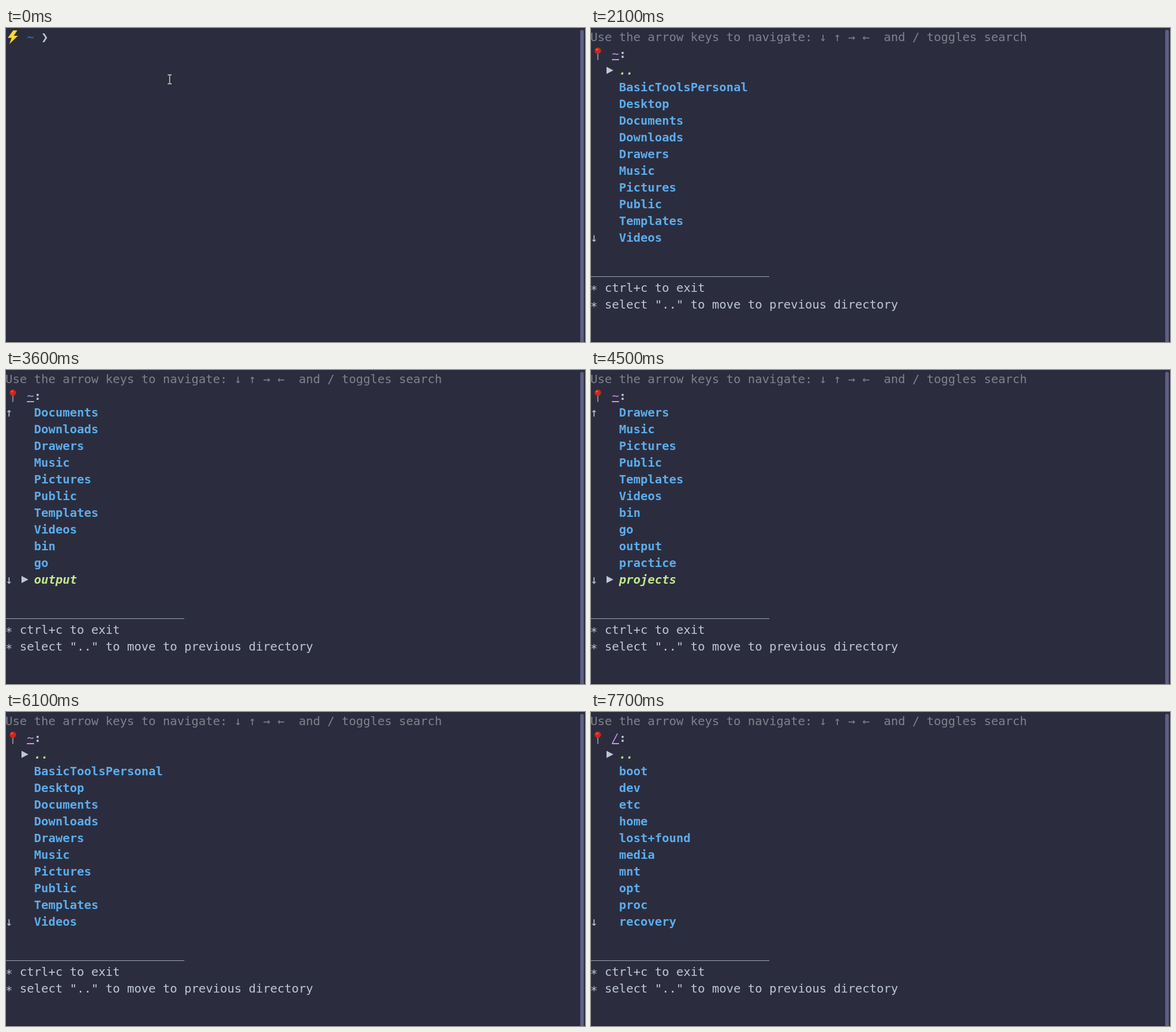
Recreate the animation shown at these times as an HTML page. Size 971 by 526 pixels, loop 8000 ms.

```html
<!DOCTYPE html>
<html lang="en">
<head>
<meta charset="utf-8">
<title>Directory navigator</title>
<style>
  html, body { margin: 0; width: 100%; height: 100%; overflow: hidden; background: #2b2d3e; }
  pre {
    position: absolute; left: -1px; top: 1px; margin: 0;
    font: 20px/28px "DejaVu Sans Mono", monospace;
    letter-spacing: calc(12px - 1ch);
    color: #bfc7d5;
  }
  svg { position: absolute; left: 0; top: 0; }
  .hint { color: #7f828c; }
  .path { color: #c792ea; font-style: italic; text-decoration: underline 2px; text-underline-offset: 2px; }
  .dir { color: #5cadec; font-weight: bold; }
  .picked { color: #c3e88d; font-weight: bold; font-style: italic; }
  .home { color: #0c80e8; }
  .cursor { display: inline-block; width: 12px; height: 28px; vertical-align: top; background: #bfc7d5; }
  .star { position: relative; top: 3px; }
  .rule { position: relative; top: -2px; }
</style>
</head>
<body>
<pre id="screen"></pre>
<svg width="971" height="526">
  <rect x="963" y="3" width="6" height="540" rx="3" fill="#5d6083"/>
  <rect y="524" width="963" height="2" fill="#262838"/>
  <path id="bolt" d="M12 4 3 16.5h6.5L5.5 27 20 13h-7l6-9z" fill="#fdd835"/>
  <g id="pin">
    <path d="M11.5 42v11.5" stroke="#9aa3ab" stroke-width="1.6"/>
    <circle cx="11.5" cy="38" r="5.3" fill="#d3241d"/>
    <circle cx="10" cy="36" r="1.6" fill="#f0604f"/>
  </g>
  <path id="marker" d="M26 65v12l11.5-6z" fill="#bfc7d5"/>
  <path id="mouse" d="M271 78.500h7M274.500 78.500v15M271 93.500h7" fill="none"
        stroke="#b4b4b4" stroke-width="2" style="filter:drop-shadow(0 0 1px #000)"/>
</svg>
<script>
const LOOP = 8000, VISIBLE = 11, ROW = 28;
const el = id => document.getElementById(id);

const places = {
  "~": ("..,BasicToolsPersonal,Desktop,Documents,Downloads,Drawers,Music,Pictures,Public," +
        "Templates,Videos,bin,go,output,practice,projects,snap,tools").split(","),
  "/home": ["..", "user"],
  "/": "..,boot,dev,etc,home,lost+found,media,mnt,opt,proc,recovery,root".split(",")
};

// [time, command, cursor shown]
const typing = [
  [0, "", false], [200, "n", false], [300, "n", true], [400, "na", false], [500, "na", true],
  [1100, "nav", false], [1200, "nav", true], [1300, "nav", false], [1400, "nav", true]
];
// [time, selected entry]
const moves = [
  [2000, 0], [2700, 1], [3200, 3], [3300, 6], [3400, 9], [3500, 12], [3600, 13],
  [4000, 14], [4500, 15], [4600, 17], [5100, 16],
  [5600, 15], [5700, 12], [5800, 9], [5900, 6], [6000, 3], [6100, 0]
];

const span = (kind, text) => `<span class="${kind}">${text}</span>`;
const show = (id, on) => el(id).style.display = on ? "" : "none";

function prompt(t) {
  const [, command, cursor] = typing.findLast(step => step[0] <= t);
  return `   ${span("home", "~")} ❯  ${command}${cursor ? span("cursor", "") : ""}`;
}

function menu(t) {
  const path = t < 6700 ? "~" : t < 7700 ? "/home" : "/";
  const items = places[path];
  let top = 0, selected = 0;
  for (const [time, index] of moves) {
    if (time > t) break;
    selected = index;
    top = Math.min(Math.max(top, index - VISIBLE + 1), index);
  }
  const shown = items.slice(top, top + VISIBLE);
  const rows = shown.map((name, i) => {
    const above = i === 0 && top > 0;
    const below = i === VISIBLE - 1 && top + VISIBLE < items.length;
    const arrow = above ? "↑" : below ? "↓" : " ";
    return arrow + "   " + span(top + i === selected ? "picked" : "dir", name);
  });
  el("marker").setAttribute("transform", `translate(0 ${(selected - top) * ROW})`);

  const star = span("star", "*");
  const footer = ["", span("rule", "_".repeat(25)), `${star} ctrl+c to exit`,
                  `${star} select ".." to move to previous directory`];
  return [
    span("hint", "Use the arrow keys to navigate: ↓ ↑ → ←  and / toggles search"),
    `   ${span("path", path)}<b>:</b>`,
    ...rows,
    ...(t < 2100 ? [] : footer)
  ].join("\n");
}

let last = "";
function draw(now) {
  const t = now % LOOP;
  const html = t < 1900 ? prompt(t) : t < 2000 ? "" : menu(t);
  if (html !== last) el("screen").innerHTML = last = html;
  show("bolt", t < 1900);
  show("mouse", t < 200);
  show("pin", t >= 2000);
  show("marker", t >= 2000);
  requestAnimationFrame(draw);
}
draw(0);
</script>
</body>
</html>
```
